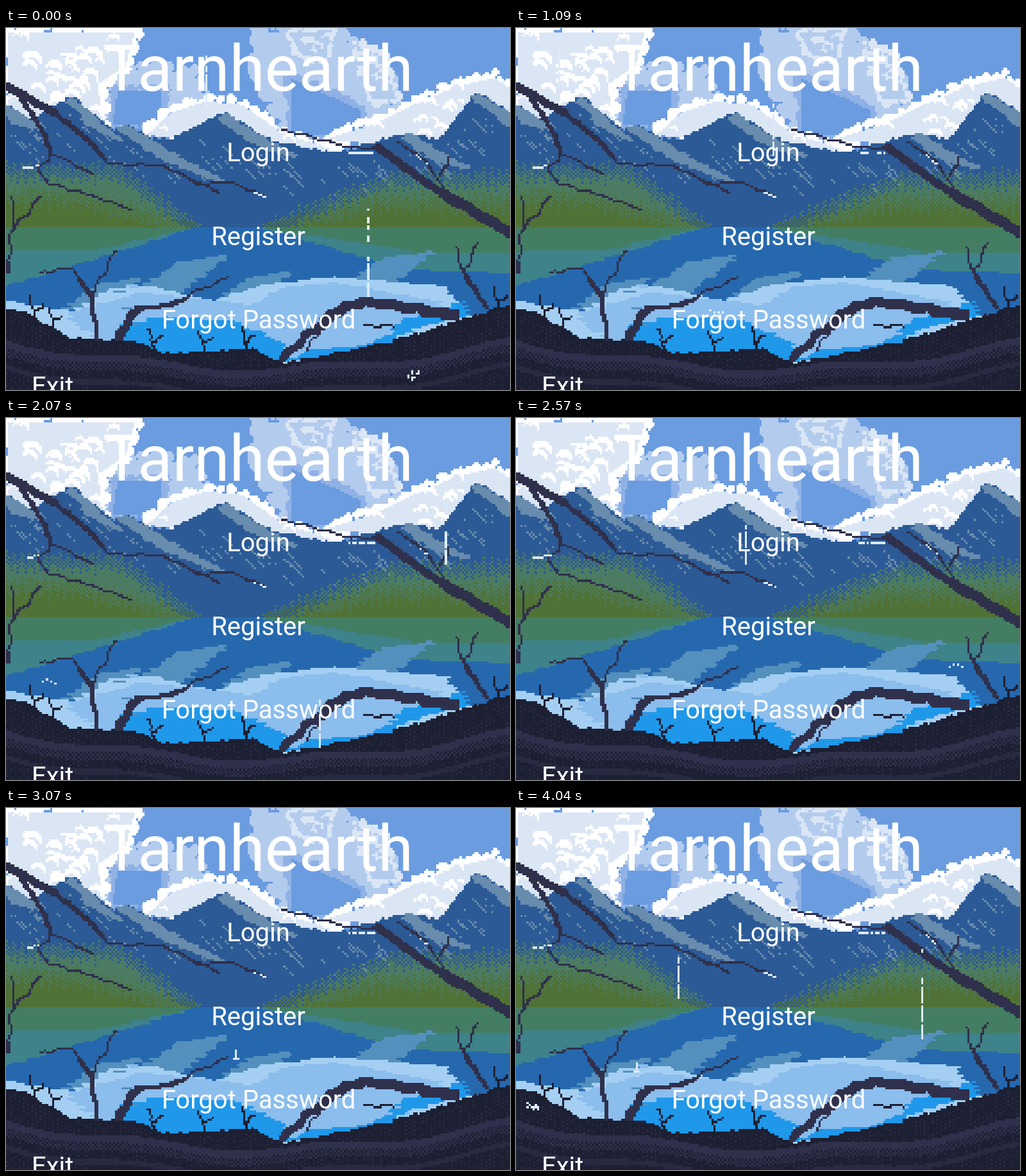
Write an HTML page with a canvas that moves like this. It is 786 by 565 pixels and loops after 4170 ms.

```html
<!DOCTYPE html>
<html lang="en">
<head>
<meta charset="utf-8">
<title>Tarnhearth</title>
<style>
  html, body { margin: 0; width: 100%; height: 100%; overflow: hidden; background: #1d2033; }
  #stage { position: absolute; left: 0; top: 0; width: 786px; height: 565px; overflow: hidden; }
  canvas { position: absolute; left: 0; top: 0; width: 786px; height: 566.575px; image-rendering: pixelated; }
  svg { position: absolute; left: 0; top: 0; }
  text { font-family: Roboto, sans-serif; font-size: 40px; fill: #fff; text-anchor: middle; }
  .title { font-size: 100px; }
  .exit { text-anchor: start; }
</style>
</head>
<body>
<div id="stage">
  <canvas id="scene" width="240" height="173"></canvas>
  <svg width="786" height="565">
    <text class="title" x="393" y="98">Tarnhearth</text>
    <text x="393.5" y="208">Login</text>
    <text x="393.5" y="338.5">Register</text>
    <text x="394" y="469">Forgot Password</text>
    <text class="exit" x="40" y="573">Exit</text>
  </svg>
</div>
<script>
const CELL = 3.275, COLS = 240, ROWS = 173, LOOP = 4170, SHORE = 311;
const ctx = document.getElementById('scene').getContext('2d');

const SKY = '#6b9ce0', MID = '#8fb1e6', HAZE = '#b3ccee', PALE = '#dbe6f5', WHITE = '#ffffff';
const ROCK = '#2c5a96', SLOPE = '#688cad', PINE = '#4b7b62', GRASS = '#507236';
const LAKE = '#2668ae', GLINT = '#5490bd', SOIL = '#1d2033', BARK = '#2f304b', DROP = '#dcebfa';

let seed = 1;
const rnd = () => (seed = (seed * 16807) % 2147483647) / 2147483647;
const hash = (a, b) => { const v = Math.sin(a * 127.1 + b * 311.7) * 43758.5453; return v - Math.floor(v); };
const points = s => s.split(' ').map(p => p.split(',').map(Number));
const lerp = (a, b, t) => a + (b - a) * t;
const cell = v => Math.round(v / CELL);

// Height at x along a line through key points
function through(path) {
  const pts = points(path);
  return x => {
    const i = Math.max(1, pts.findIndex(p => p[0] >= x));
    const [x0, y0] = pts[i - 1], [x1, y1] = pts[i];
    return lerp(y0, y1, (x - x0) / (x1 - x0));
  };
}

function box(x, y, w, h, color) {
  ctx.fillStyle = color;
  ctx.fillRect(x, y, w, h);
}

// Hard-edged scanline fill; shift(row) moves single rows sideways
function poly(path, color, shift = () => 0) {
  const pts = typeof path === 'string' ? points(path) : path;
  for (let row = 0; row < ROWS; row++) {
    const y = (row + .5) * CELL, cuts = [];
    pts.forEach(([x0, y0], i) => {
      const [x1, y1] = pts[(i + 1) % pts.length];
      if ((y0 <= y) !== (y1 <= y)) cuts.push(x0 + (y - y0) / (y1 - y0) * (x1 - x0));
    });
    cuts.sort((a, b) => a - b);
    for (let i = 0; i + 1 < cuts.length; i += 2) {
      const a = cell(cuts[i]);
      box(a + shift(row), row, cell(cuts[i + 1]) - a, 1, color);
    }
  }
}

function disc(x, y, r, color) {
  for (let row = Math.floor((y - r) / CELL); row <= (y + r) / CELL; row++) {
    const d = (row + .5) * CELL - y;
    if (Math.abs(d) > r) continue;
    const half = Math.sqrt(r * r - d * d), a = cell(x - half);
    box(a, row, Math.max(1, cell(x + half) - a), 1, color);
  }
}

// Bumpy outline in the rim colour, filled with scalloped puffs
function cloud(path, rim, body, r, puffs = 0) {
  const pts = points(path);
  const edge = pts.flatMap(([x0, y0], i) => {
    const [x1, y1] = pts[(i + 1) % pts.length];
    const n = Math.ceil(Math.hypot(x1 - x0, y1 - y0) / r);
    return Array.from({ length: n }, (_, j) => [lerp(x0, x1, j / n), lerp(y0, y1, j / n)]);
  });
  const mx = edge.reduce((s, p) => s + p[0], 0) / edge.length;
  const my = edge.reduce((s, p) => s + p[1], 0) / edge.length;
  edge.forEach(([x, y]) => disc(x + (rnd() - .5) * r, y + (rnd() - .5) * r, r * (.5 + rnd() * .6), rim));
  poly(edge.map(([x, y]) => [lerp(x, mx, .04), lerp(y, my, .04) + r * .3]), body);
  Array.from({ length: puffs }, () => {
    const [x, y] = edge[Math.floor(rnd() * edge.length)], t = .1 + rnd() * .8;
    return [lerp(x, mx, t), lerp(y, my, t), r * (.6 + rnd() * .7)];
  }).sort((a, b) => a[1] - b[1]).forEach(([x, y, s]) => {
    disc(x, y, s, rim);
    disc(x - s * .15, y + s * .6, s * .9, body);
  });
}

function limb(path, from, to, color = BARK) {
  const pts = points(path), last = pts.length - 1;
  for (let i = 0; i < last; i++) {
    const [x0, y0] = pts[i], [x1, y1] = pts[i + 1];
    const n = Math.ceil(Math.hypot(x1 - x0, y1 - y0) / 2);
    for (let j = 0; j <= n; j++) {
      const t = j / n, w = lerp(from, to, (i + t) / last) * .85;
      const bend = Math.sin(Math.PI * t) * Math.sin(j * .3 + x0) * 2.5;
      const size = Math.max(1, cell(w));
      box(cell(lerp(x0, x1, t) + bend - w / 2), cell(lerp(y0, y1, t) + bend - w / 2), size, size, color);
    }
  }
}

function drawSky(flash) {
  box(0, 0, COLS, ROWS, [SKY, HAZE, PALE][flash]);
  cloud('165,60 295,65 320,125 165,150', HAZE, HAZE, 9);
  cloud('392,0 510,0 595,60 610,150 430,150 390,70', HAZE, HAZE, 12);
  cloud('172,95 245,95 245,150 165,150', MID, SKY, 8);
  cloud('445,75 555,125 560,165 445,165', MID, SKY, 9);
  cloud('440,5 508,0 500,48 460,40', PALE, HAZE, 8, 6);
  cloud('545,25 588,40 610,110 570,112', PALE, HAZE, 8, 8);
  cloud('0,0 205,0 190,55 145,85 155,150 0,150', WHITE, PALE, 11, 34);
  cloud('212,165 255,128 310,110 370,116 430,160 520,190', WHITE, PALE, 8, 9);
  cloud('490,172 570,147 620,122 700,88 765,72 800,95 800,200', WHITE, PALE, 9, 16);
}

// x, y, left fall, right fall, length of the sunlit face
const PEAKS = [
  [-10, 115, 1, .6, 65], [100, 107, .57, .85, 85], [185, 151, .5, .53, 165],
  [338, 132, .5, .6, 120], [625, 162, .3, .25, 100], [735, 101, 1.3, .65, 120]
];
const ridge = x => Math.min(
  171 + 20 * Math.exp(-(((x - 510) / 70) ** 2)),
  ...PEAKS.map(([px, py, l, r]) => py + Math.max(0, Math.abs(x - px) - 6) * (x < px ? l : r))
);

function drawHills() {
  for (let col = 0; col < COLS; col++) {
    const top = cell(ridge(col * CELL) + hash(col >> 1, 1) * 4);
    box(col, top, 1, ROWS - top, ROCK);
  }
  PEAKS.forEach(([x, y, , fall, len]) => {
    const s = Math.max(.57, fall);
    const at = (t, drop) => [x + len * t, y + len * t * s + drop];
    poly([at(-.12, 16), at(0, 0), at(.5, 2), at(1, 0), at(.72, 14), at(.3, 24)], SLOPE, row => Math.round(hash(row, 9) * 2));
  });

  // Broken diagonal scree
  for (let i = 0; i < 90; i++) {
    const x = Math.floor(rnd() * COLS), y = cell(ridge(x * CELL) + 15 + rnd() * 55);
    for (let j = 0, n = 2 + rnd() * 6; j < n; j++) if (rnd() < .6) box(x + j, y + j, 1, 1, SLOPE);
  }
}

// Wooded banks rise from the waterline to height h within the given reach
function bank(edge, dir, h, reach, color) {
  for (let d = 0; d < 390; d += CELL) {
    const col = cell(edge + dir * d);
    const peak = Math.abs(((col * 3) % 11) - 5) / 5;
    const top = cell(SHORE - h * Math.min(1, d / reach) - (peak - .5) * 16 * Math.min(1, d / 60) - rnd() * 8);
    for (let y = top; y < 95; y++) if (y > top + 5 || (col + y) % 2) box(col, y, 1, 1, color);
  }
}

function shade(edge, dir, h, reach, color, ripple) {
  const far = edge + dir * 420;
  poly([[edge, SHORE], [edge + dir * reach, SHORE + h], [far, SHORE + h * 1.1], [far, SHORE]], color, ripple);
}

function drawLake(step, flash) {
  const ripple = row => Math.round((hash(row, hash(row, 4) < .15 ? step : 0) - .5) * 5);
  const deep = flash ? '#b7cdf0' : '#1f98ea';
  box(0, 95, COLS, ROWS, LAKE);
  shade(298, -1, 90, 290, '#3e828a', ripple);
  shade(398, 1, 66, 225, '#3e828a', ripple);
  shade(298, -1, 36, 160, '#437e63', ripple);
  shade(398, 1, 38, 240, '#437e63', ripple);

  const floor = ' 660,525 -20,525';
  const streak = (x, y, w) => poly([[x, y], [x + w * .45, y - w * .3], [x + w, y - w * .38], [x + w * .5, y + 4]], GLINT, ripple);
  streak(88, 438, 130);
  streak(205, 408, 145);
  streak(330, 424, 120);
  streak(520, 404, 150);
  poly('-20,422 100,442 165,407 220,401 325,425 400,401 510,388 685,402 722,450' + floor, '#a4cff2', ripple);
  poly('92,445 215,412 385,432 435,404 520,397 682,428 640,470 480,525 140,485', '#8bbded', ripple);
  poly('180,464 240,450 360,456 440,498 435,524 182,500', deep, ripple);
  poly('588,484 622,455 712,426 720,448', deep, ripple);
  poly('430,522 475,503 550,496 620,470 600,495', deep, ripple);
  for (let i = 0; i < 10; i++) {
    box(50 + Math.floor(rnd() * 14), 120 + Math.floor(rnd() * 22), 3 + Math.floor(rnd() * 5), 1, i % 2 ? GLINT : '#8bbded');
  }
}

const ground = through('0,435 28,442 100,482 210,487 240,505 385,498 430,521 600,486 700,456 786,428 820,420');

function drawGround() {
  for (let col = 0; col < COLS; col++) {
    const x = col * CELL, top = cell(ground(x) + hash(col >> 1, 5) * 4);
    const fold = 486 + 42 * Math.sin(Math.PI * x / 786) + 6 * Math.sin(x / 45);
    box(col, top, 1, ROWS - top, SOIL);
    for (let y = top + 2; y < ROWS; y++) {
      const below = y * CELL - fold, later = below - 38;
      if (below > 0 && below < 11) box(col, y, 1, 1, BARK);
      else if (below >= 11 && below < 24 && (col + y) % 2) box(col, y, 1, 1, BARK);
      else if (later > 0 && later < 8) box(col, y, 1, 1, '#282a42');
      else if ((col + 2 * (y % 2)) % 4 === 0 && hash(col, y) < .55) box(col, y, 1, 1, '#272940');
    }
  }
}

function drawBranches() {
  limb('0,90 75,132 130,176 160,212', 12, 5);
  limb('160,212 245,215 332,256', 4, 3);
  limb('22,106 60,165 70,200 50,222', 9, 4);
  limb('70,195 135,227', 4, 3);
  limb('50,222 65,242 130,260 195,283', 4, 3);
  limb('295,244 350,240 403,262', 3, 3);
  limb('790,322 660,245 580,186', 16, 10);
  limb('583,187 540,187 430,158', 6, 3);
  limb('690,260 655,208 612,178', 6, 3);
  limb('677,230 690,200', 3, 3);
  limb('3,380 12,290 8,262', 6, 3);
  limb('8,318 54,262', 4, 3);
  limb('143,484 133,418 103,374 55,380', 9, 3);
  limb('133,418 170,348', 4, 3);
  limb('175,480 205,438 255,432 346,388', 14, 3);
  limb('430,516 510,445 557,426 700,448', 12, 18);
  limb('491,470 470,501', 5, 3);
  limb('750,436 712,380 703,343', 8, 3);
  limb('715,380 735,335', 4, 3);
  limb('558,463 605,465', 3, 3, SOIL);

  // Forked twigs along the shore
  [45, 75, 230, 308, 375, 768].forEach(x => {
    const y = ground(x), h = 28 + rnd() * 12;
    limb(`${x},${y} ${x - 8},${y - h}`, 3, 3, SOIL);
    limb(`${x - 2},${y - 8} ${x + 13},${y - h * .6}`, 3, 3, SOIL);
  });
}

// Wet beads that glitter on the branches
function beads(x, y, n, fall, step) {
  for (let i = 0; i < n; i++) if (hash(i + x, step % 5) < .72) box(cell(x) + i, cell(y + i * fall), 1, 1, DROP);
}

// x, landing height, landing step
const DROPS = [
  [637, 540, 0], [565, 420, 1], [313, 445, 3], [67, 413, 7], [400, 520, 7], [490, 515, 9],
  [687, 388, 10], [360, 390, 13], [28, 466, 17], [188, 411, 17], [253, 297, 18], [635, 360, 18]
];

function drawRain(step) {
  DROPS.forEach(([x, y, land]) => {
    const age = step - land, col = cell(x - 1.6), row = cell(y);
    const dot = (dx, dy) => box(col + dx, row + dy, 1, 1, DROP);
    const inGround = y > ground(x);
    if (age < 0 && age >= -3) {
      const head = cell(y + 160 * (age + 1)), len = 30 + hash(x, 2) * 18;
      for (let i = 1; i < len; i++) {
        const gap = i % 9 === 8 || (i > len * .45 && hash(Math.floor(i / 3), x) < .5);
        if (!gap) box(col, head - i, 1, 1, DROP);
      }
    } else if (age === 0 && inGround) {
      for (let i = 0; i < 12; i++) dot(Math.round((hash(i, x) - .5) * 7), Math.round((hash(x, i) - .5) * 5));
    } else if (age === 0) {
      box(col, row - 4, 1, 5, DROP);
      box(col - 1, row, 3, 1, DROP);
    } else if (age === 1 && !inGround) {
      for (let i = -3; i < 5; i += 2) dot(i, -Math.round(hash(i, x) * 2));
    }
  });
}

function draw(step) {
  const flash = step === 14 ? 2 : step === 12 || step === 15 ? 1 : 0;
  seed = 4217;
  drawSky(flash);
  drawHills();
  bank(300, -1, 92, 130, PINE);
  bank(400, 1, 80, 200, PINE);
  bank(300, -1, 52, 190, GRASS);
  bank(400, 1, 42, 180, GRASS);
  drawLake(step, flash);
  drawGround();
  drawBranches();
  beads(25, 217, 9, -.5, step);
  beads(385, 254, 6, 1.6, step);
  beads(535, 193, 13, 0, step);
  beads(640, 198, 6, 2.6, step);
  drawRain(step);
}

// Steps alternate between 240 and 260 ms after a short first one
let shown = -1;
function tick() {
  const t = performance.now() % LOOP;
  const step = t < 110 ? 0 : Math.min(17, 1 + Math.floor((t - 110) / 245.6));
  if (step !== shown) draw(shown = step);
  requestAnimationFrame(tick);
}
tick();
</script>
</body>
</html>
```
